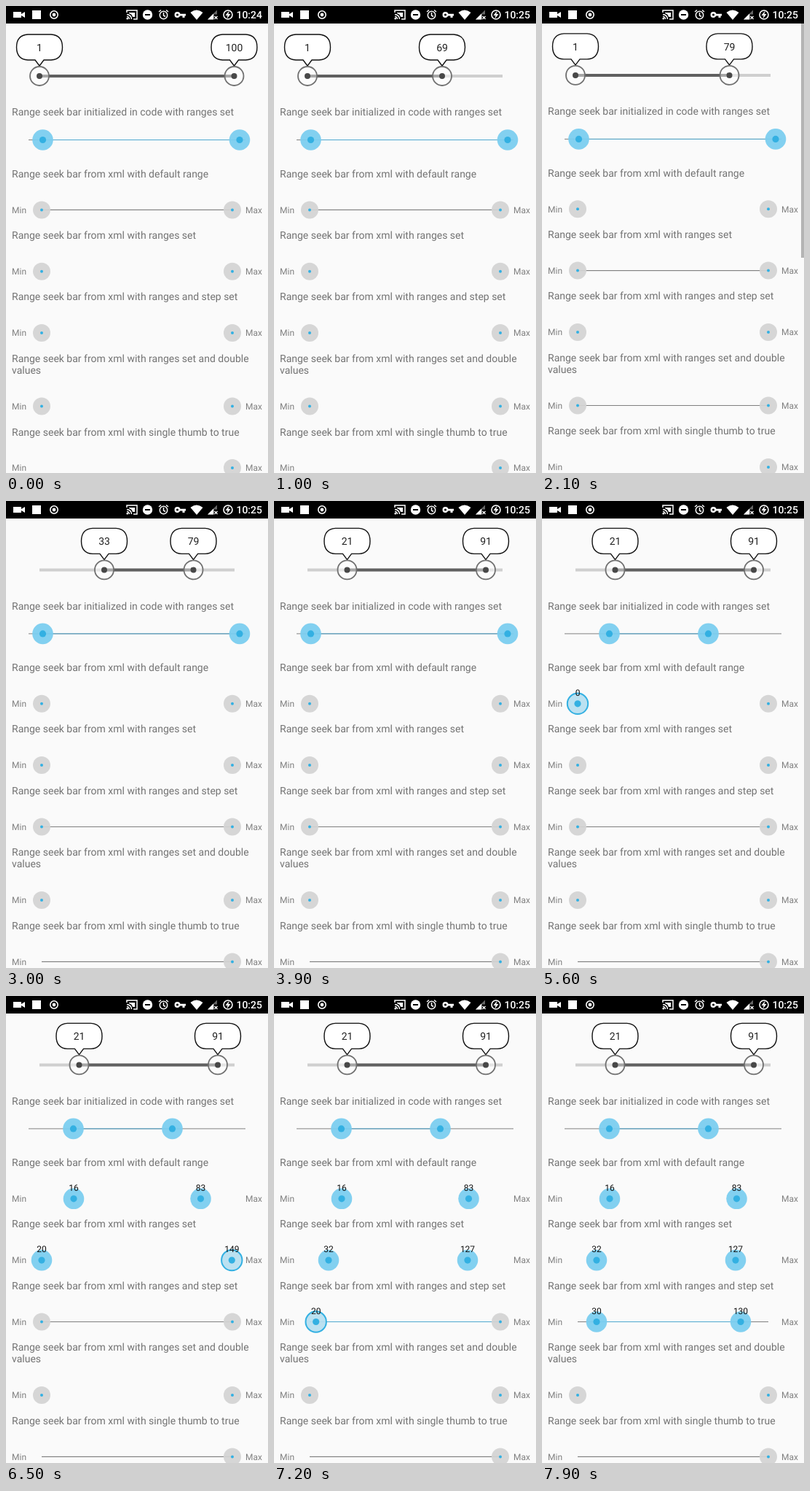
Recreate the animation shown at these times as an HTML page. Size 360 px wide and 640 px high, loop 8000 ms.

```html
<!DOCTYPE html>
<html lang="en">
<head>
<meta charset="utf-8">
<title>Range seek bars</title>
<style>
  html, body { margin: 0; width: 100%; height: 100%; overflow: hidden; background: #fafafa; }
  svg { display: block; width: 360px; height: 640px; font-family: Roboto, sans-serif; text-rendering: geometricPrecision; }
  .title { font-size: 14px; fill: #737373; }
  .side { font-size: 12px; fill: #808080; }
  .value { font-size: 12px; fill: #111; text-anchor: middle; }
  .bubble { font-size: 14px; fill: #222; text-anchor: middle; }
  .clock { font-size: 14px; fill: #fff; font-weight: 500; text-anchor: end; }
</style>
</head>
<body>
<svg viewBox="0 0 360 640">
  <g id="page"></g>
  <rect width="360" height="24"/>
  <g fill="#fff">
    <path d="M10 8h11v3l5-3v8l-5-3v3h-11z"/>
    <rect x="36" y="6" width="12" height="12"/>
    <circle cx="66" cy="12" r="5.2" fill="none" stroke="#fff" stroke-width="1.6"/>
    <circle cx="66" cy="12" r="2.4"/>
    <g fill="none" stroke="#fff" stroke-width="1.5">
      <path d="M166 9V6h14v12h-5M166 11.5a6.5 6.5 0 0 1 6.5 6.5M166 14.5a3.5 3.5 0 0 1 3.5 3.5"/>
      <circle cx="216.5" cy="12.5" r="5.2"/>
      <path d="M216.5 9v4l2.5 1.5M210 8l3-2.5M223 8l-3-2.5"/>
    </g>
    <path d="M169 9h8v6h-3q-1-4-5-5z"/>
    <circle cx="166.8" cy="17.3" r="1.3"/>
    <circle cx="194.5" cy="12" r="6.7"/>
    <path d="M191 12h7" stroke="#000" stroke-width="2"/>
    <circle cx="235.5" cy="12" r="2.8" fill="none" stroke="#fff" stroke-width="2.4"/>
    <path d="M238 10.7h9v2.8h-1.5v2.5h-3v-2.5h-4.5z"/>
    <path d="M253.5 9q8.5-7 17 0l-8.5 10z"/>
    <path d="M277 18.5L290 5.5v6h-4v7z" opacity=".4"/>
    <path d="M277 18.5l8-8v8z"/>
    <path d="M286.5 14l4 4m0-4l-4 4" stroke="#fff" stroke-width="1.3"/>
    <circle cx="305" cy="12" r="6" fill="none" stroke="#fff" stroke-width="1.6"/>
    <path d="M306.5 6.5l-5 6.5h3l-1 4.5 5-6.5h-3z"/>
  </g>
  <text id="clock" class="clock" x="352" y="17"></text>
</svg>
<script>
const LOOP = 8000, STEP = 100;
const BLUE = '#33b0e2', GREY = '#808080';
const page = document.getElementById('page');
const clock = document.getElementById('clock');

// Motion tables: [ms, x]
const bubbleLeft = [[0, 46], [2200, 46], [2900, 135], [3000, 135], [3200, 98], [3300, 100.5]];
const bubbleRight = [[0, 313.5], [1000, 231], [1200, 226], [1600, 257.5],
  [3300, 257.5], [3600, 305], [3700, 288], [3900, 291]];

const rows = [
  { y: 183.5, blue: true, from: 31, to: 329,
    left: { path: [[0, 50.5], [4000, 50.5], [4700, 87], [4900, 63.5], [5100, 92.5]], press: [4000, 5100] },
    right: { path: [[0, 321], [5100, 321], [5500, 228.5]], press: [5100, 5600] } },
  { y: 279.4, min: 0, max: 100, step: 1, line: 0,
    left: { path: [[0, 49], [5600, 49], [5900, 93]], press: [5600, 6000] },
    right: { path: [[0, 311], [5900, 311], [6200, 267.5]], press: [6000, 6300] } },
  { y: 363.7, min: 20, max: 150, step: 1, line: 1,
    left: { path: [[0, 49], [6600, 49], [6800, 75]], press: [6300, 6400], again: [6700, 6900] },
    right: { path: [[0, 311], [6400, 311], [6500, 310.3], [6700, 266]], press: [6500, 6700] } },
  { y: 448.1, min: 20, max: 150, step: 10, line: 2,
    left: { path: [[0, 49], [7100, 49], [7400, 75]], press: [7100, 7500] },
    right: { path: [[0, 311], [7500, 311], [7800, 273]], press: [7500, 7900] } },
  { y: 548.6, line: 1, left: { path: [[0, 49]] }, right: { path: [[0, 311]] } },
  { y: 633, line: 2, right: { path: [[0, 311]] } }
];

const titles = [
  [150.4, 'Range seek bar initialized in code with ranges set'],
  [234.8, 'Range seek bar from xml with default range'],
  [319.1, 'Range seek bar from xml with ranges set'],
  [403.4, 'Range seek bar from xml with ranges and step set'],
  [487.7, 'Range seek bar from xml with ranges set and double'],
  [504.1, 'values'],
  [588.5, 'Range seek bar from xml with single thumb to true']
];

function at(path, t) {
  let prev = path[0];
  for (const next of path) {
    if (t < next[0]) return prev[1] + (next[1] - prev[1]) * (t - prev[0]) / (next[0] - prev[0]);
    prev = next;
  }
  return prev[1];
}

const within = (t, span) => !!span && t >= span[0] && t < span[1];
const touched = (side, t) => !!side.press && t >= side.press[0];
const text = (cls, x, y, s, extra = '') => `<text class="${cls}" x="${x}" y="${y}" ${extra}>${s}</text>`;
const dot = (x, y, r, fill, extra = '') => `<circle cx="${x}" cy="${y}" r="${r}" fill="${fill}" ${extra}/>`;
const line = (x1, x2, y, color, w = 1) =>
  `<path d="M${x1} ${y}H${x2}" stroke="${color}" stroke-width="${w}"/>`;

function bubble(x) {
  const value = Math.floor(1 + (x - 46) / 267.5 * 99);
  return `<g transform="translate(${x} 0)">
    <path d="M-16 39H16Q31.5 40 31.5 56.5T16 74H6L0 82L-6 74H-16Q-31.5 73 -31.5 56.5T-16 39Z"
      fill="#fff" stroke="#111" stroke-width="1.4"/>
    ${text('bubble', 0, 62, value)}
    ${dot(0, 96, 13, '#fff', 'fill-opacity=".45" stroke="#707070" stroke-width="1.8"')}
    ${dot(0, 96, 4, '#484848')}</g>`;
}

function thumb(row, side, t) {
  const x = at(side.path, t);
  if (within(t, side.press) || within(t, side.again)) {
    return dot(x, row.y, 14.2, '#b5def0', `fill-opacity=".92" stroke="${BLUE}" stroke-width="2"`)
      + dot(x, row.y, 4.6, BLUE);
  }
  if (row.blue || touched(side, t)) {
    return dot(x, row.y, 14.3, '#7acdef', 'fill-opacity=".94"') + dot(x, row.y, 4.6, BLUE);
  }
  return dot(x, row.y, 12, '#d2d2d2', 'fill-opacity=".92"') + dot(x, row.y, 2, BLUE);
}

function valueLabel(row, side, t) {
  if (row.max === undefined || !touched(side, t)) return '';
  const x = at(side.path, t);
  const raw = row.min + (x - 49) / 262 * (row.max - row.min);
  return text('value', x, row.y - 10.6, Math.floor(raw / row.step) * row.step);
}

function seekBar(row, t, phase) {
  const sides = [row.left, row.right].filter(Boolean);
  const a = row.left ? at(row.left.path, t) : 49;
  const b = at(row.right.path, t);
  const active = row.blue || sides.some(s => touched(s, t));
  let out = '';
  if (row.blue || row.line === phase) {
    out += line(row.from || 49, row.to || 311, row.y, GREY);
    out += line(a, b, row.y, active ? '#4fa9d0' : GREY);
  }
  out += sides.map(s => thumb(row, s, t)).join('');
  out += sides.map(s => valueLabel(row, s, t)).join('');
  if (!row.blue) {
    out += text('side', 8, row.y + 4.3, 'Min') + text('side', 352, row.y + 4.3, 'Max', 'text-anchor="end"');
  }
  return out;
}

function draw(t) {
  const phase = t < 2000 ? 0 : t < 2200 ? 1 : 2;
  const shift = [0, -1.1, -1.6][phase];
  const l = at(bubbleLeft, t), r = at(bubbleRight, t);
  const bar = t < 1700 ? 0 : at([[2300, 1], [2600, 0]], Math.max(t, 2300));
  page.innerHTML = `<g transform="translate(0 ${shift})">`
    + line(46, 314, 96, '#cfcfcf', 4) + line(l, r, 96, '#606060', 4)
    + bubble(l) + bubble(r)
    + titles.map(([y, s]) => text('title', 8, y, s)).join('')
    + rows.map(row => seekBar(row, t, phase)).join('')
    + `</g><rect x="356" y="24" width="4" height="321" fill="#b4b4b4" opacity="${bar}"/>`;
  clock.textContent = t < 500 ? '10:24' : '10:25';
}

let shown = -1;
function tick() {
  const t = Math.floor(performance.now() % LOOP / STEP) * STEP;
  if (t !== shown) draw(shown = t);
  requestAnimationFrame(tick);
}
tick();
</script>
</body>
</html>
```
